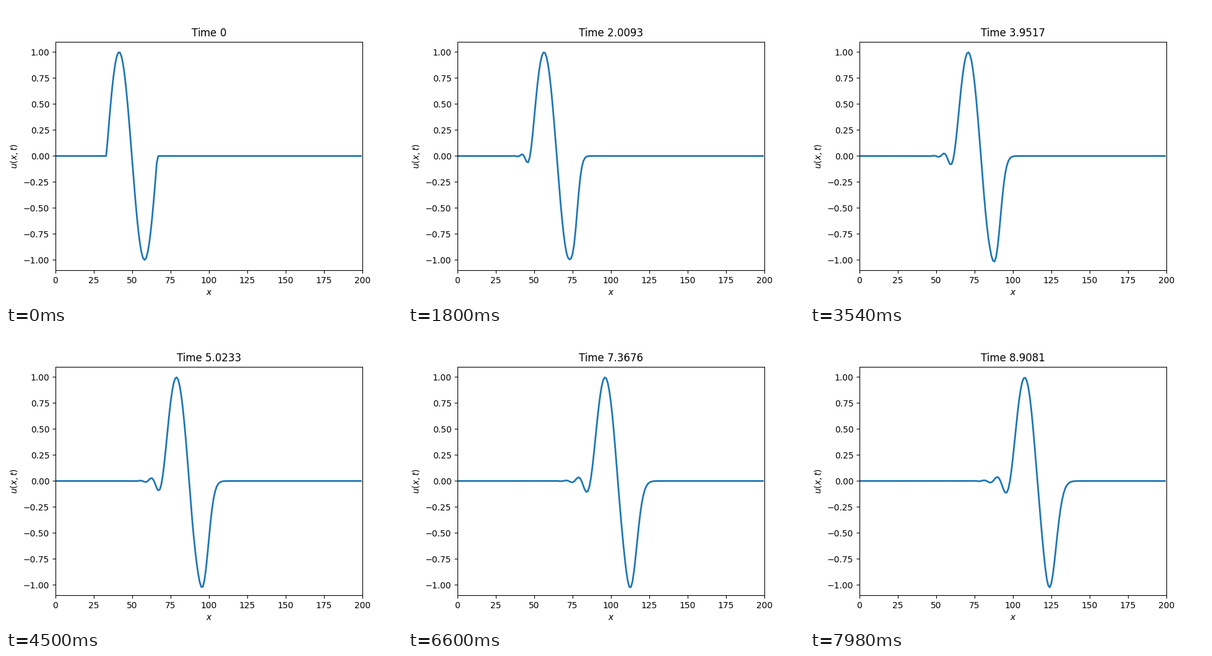
Animation of 640x480 px, one loop 8000 ms. Source, as a matplotlib script:

```python
import numpy as np
import matplotlib.pyplot as plt
from matplotlib.animation import FuncAnimation

# Advection u_t + c u_x = 0, solved with the Lax-Wendroff scheme
CELLS = 200
STEPS = 133
CFL = 0.5
DT = 0.06697799  # CFL * dx / sqrt(2), shortened
TICK = 20        # ms per drawn frame
HOLD = 3         # drawn frames per time step
LOOP = 8000

SPECIAL = {0: "$0$"}
for target, label in ((np.pi / 2, r"$\pi/2$"), (np.pi, r"$\pi$"),
                      (2 * np.pi, r"$2\pi$")):
    SPECIAL[round(target / DT)] = label


def solve():
    x = np.linspace(0, 12 * np.pi, CELLS)
    u = np.where((x >= 2 * np.pi) & (x <= 4 * np.pi), np.sin(x), 0.0)
    states = [u]
    for _ in range(STEPS):
        left, right = np.roll(u, 1), np.roll(u, -1)
        u = (u - CFL / 2 * (right - left)
             + CFL ** 2 / 2 * (right - 2 * u + left))
        u[0] = u[-1] = 0
        states.append(u)
    return states


def title_text(step):
    t = step * DT
    value = SPECIAL.get(step, str(round(t, 5 if t < 1 else 4)))
    return f"Time {value}"


states = solve()

fig, ax = plt.subplots(figsize=(6.4, 4.8), dpi=100)
line, = ax.plot(np.arange(CELLS), states[0], lw=2)
ax.set_xlim(0, 200)
ax.set_ylim(-1.1, 1.1)
ax.set_xlabel("$x$")
ax.set_ylabel("$u(x,t)$")
title = ax.set_title(title_text(0))


def update(i):
    step = min(i // HOLD, STEPS)
    line.set_ydata(states[step])
    title.set_text(title_text(step))
    return line, title


anim = FuncAnimation(fig, update, frames=LOOP // TICK, interval=TICK,
                     repeat=True, repeat_delay=0, blit=False)
plt.show()
```
